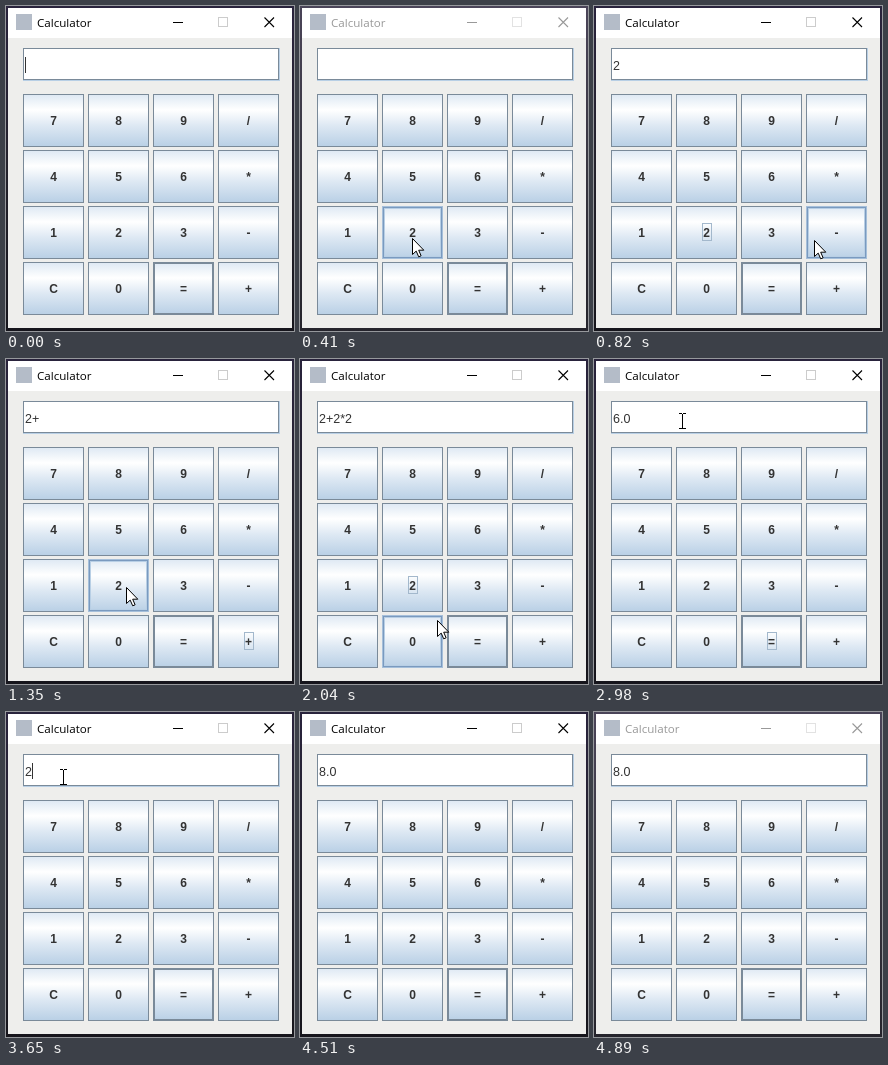
Recreate the animation shown at these times as an HTML page with a canvas. Size 288x325 px, loop 4990 ms.

```html
<!DOCTYPE html>
<html lang="en">
<head>
<meta charset="utf-8">
<title>Calculator</title>
<style>
  html, body { margin: 0; width: 100%; height: 100%; overflow: hidden; }
  canvas { display: block; }
</style>
</head>
<body>
<canvas id="stage" width="288" height="325"></canvas>
<script>
const ctx = document.getElementById('stage').getContext('2d', { alpha: false });
const LOOP = 4990;
const KEYS = '789/456*123-C0=+';
const BTN_W = 61, BTN_H = 53;
const SLATE = '#7a8a99', INK = '#333333';

// start time, pointer x, pointer y, display text, focused part, mode
const STEPS = [
  [0, -1, -1, '', 'field', ''],
  [140, 235, 253, '', '', 'inactive'],
  [280, 165, 236, '', '', 'inactive'],
  [410, 112, 232, '', '', 'inactive'],
  [550, 112, 232, '', '2', 'press'],
  [680, 112, 232, '2', '2', ''],
  [820, 220, 234, '2', '2', ''],
  [950, 234, 264, '2', '2', ''],
  [1080, 234, 264, '2+', '+', 'press'],
  [1210, 175, 240, '2+', '+', ''],
  [1350, 120, 228, '2+', '+', ''],
  [1480, 120, 228, '2+2', '2', ''],
  [1620, 230, 168, '2+2', '2', ''],
  [1750, 230, 168, '2+2*', '*', 'press'],
  [1880, 120, 240, '2+2*', '*', ''],
  [2040, 137, 261, '2+2*2', '2', ''],
  [2170, 165, 270, '2+2*2', '=', 'press'],
  [2300, 165, 270, '6.0', '=', ''],
  [2440, 122, 178, '6.0', '=', ''],
  [2570, 105, 118, '6.0', '=', ''],
  [2710, 95, 100, '6.0', '=', ''],
  [2840, 94, 74, '6.0', '=', ''],
  [2980, 88, 62, '6.0', '=', ''],
  [3120, 60, 160, '6.0', '=', ''],
  [3250, 45, 275, '6.0', '=', ''],
  [3390, 45, 275, '', 'C', 'press'],
  [3520, 57, 65, '', 'field', ''],
  [3650, 57, 65, '2', 'field', ''],
  [3790, 57, 65, '(2+2', '', ''],
  [3900, 57, 65, '(2+2)*2', '', ''],
  [4510, -1, -1, '8.0', '', ''],
  [4650, -1, -1, '8.0', '', 'inactive']
];

function fill(color, x, y, w, h) {
  ctx.fillStyle = color;
  ctx.fillRect(x, y, w, h);
}

function frame(color, x, y, w, h) {
  ctx.strokeStyle = color;
  ctx.lineWidth = 1;
  ctx.strokeRect(x + .5, y + .5, w - 1, h - 1);
}

function label(text, x, y, font, color, align = 'left') {
  ctx.font = font;
  ctx.fillStyle = color;
  ctx.textAlign = align;
  ctx.fillText(text, x, y);
}

function shade(y, h, stops) {
  const g = ctx.createLinearGradient(0, y, 0, y + h);
  for (const [at, color] of stops) g.addColorStop(at, color);
  return g;
}

function drawWindow(inactive) {
  const backdrop = inactive
    ? [[0, '#4a4458'], [.5, '#383640'], [1, '#25242c']]
    : [[0, '#29233c'], [.5, '#24222c'], [1, '#16151c']];
  fill(shade(0, 325, backdrop), 0, 0, 288, 325);
  fill('#eeeeec', 2, 2, 284, 320);
  fill('#ffffff', 2, 2, 284, 30);
  fill('#b4bcc8', 10, 8, 16, 16);

  const ink = inactive ? '#999999' : '#000000';
  label('Calculator', 31, 21, '11.6px "Open Sans", sans-serif', ink);
  fill(ink, 167, 16, 10, 1);
  frame(inactive ? '#e2e2e2' : '#cccccc', 212, 11, 10, 10);
  ctx.strokeStyle = ink;
  ctx.lineWidth = 1.1;
  ctx.beginPath();
  ctx.moveTo(258.5, 11.5); ctx.lineTo(268, 21);
  ctx.moveTo(268, 11.5); ctx.lineTo(258.5, 21);
  ctx.stroke();
}

function drawField(text, caret) {
  fill('#ffffff', 17, 42, 257, 33);
  frame('#b8cfe5', 17, 42, 257, 33);
  frame(SLATE, 17, 42, 256, 32);
  label(text, 19, 64, '12.5px "Liberation Sans", sans-serif', INK);
  if (caret) fill(INK, 19 + Math.round(ctx.measureText(text).width), 51, 1, 16);
}

function drawButton(key, x, y, hover, pressed, focused) {
  fill(pressed ? '#b8cfe5' : shade(y, BTN_H, [
    [0, '#dde8f3'], [.3, '#ffffff'], [.6, '#dde8f3'], [1, '#b8cfe5']
  ]), x, y, BTN_W, BTN_H);
  frame(SLATE, x, y, BTN_W, BTN_H);
  if (key === '=') {
    frame(SLATE, x + 1, y + 1, BTN_W - 2, BTN_H - 2);
  } else if (hover && !pressed) {
    frame('#a5bfda', x, y, BTN_W, BTN_H);
    frame('#7a9abf', x + 1, y + 1, BTN_W - 2, BTN_H - 2);
    frame('#b8cfe5', x + 2, y + 2, BTN_W - 4, BTN_H - 4);
  }
  label(key, x + 30.5, y + 31, 'bold 12px "Liberation Sans", sans-serif', INK, 'center');
  if (focused) {
    const w = Math.round(ctx.measureText(key).width) + 3;
    frame('#a3b8cc', x + Math.round((BTN_W - w) / 2), y + 17, w, 18);
  }
}

function drawPointer(x, y) {
  if (x < 0) return;
  if (y >= 42 && y < 75) {
    fill('#000000', x, y - 7, 1, 15);
    for (const edge of [y - 8, y + 7]) {
      fill('#000000', x - 3, edge, 3, 1);
      fill('#000000', x + 1, edge, 3, 1);
    }
    return;
  }
  ctx.save();
  ctx.translate(x + .5, y + .5);
  const arrow = new Path2D('M0 0V16L3.7 12.6 6.2 18.3 8.6 17.3 6.2 11.7H11.3Z');
  ctx.fillStyle = '#ffffff';
  ctx.fill(arrow);
  ctx.strokeStyle = '#000000';
  ctx.lineWidth = 1;
  ctx.stroke(arrow);
  ctx.restore();
}

function draw(now) {
  const t = now % LOOP;
  const [, px, py, text, focus, mode] = STEPS.findLast(step => step[0] <= t);
  drawWindow(mode === 'inactive');
  drawField(text, focus === 'field');
  [...KEYS].forEach((key, i) => {
    const x = 17 + i % 4 * 65, y = 88 + Math.floor(i / 4) * 56;
    const hover = px >= x && px < x + BTN_W && py >= y && py < y + BTN_H;
    drawButton(key, x, y, hover, hover && mode === 'press', key === focus);
  });
  drawPointer(px, py);
}

const start = performance.now();
function tick() {
  draw(performance.now() - start);
  requestAnimationFrame(tick);
}
tick();
</script>
</body>
</html>
```
